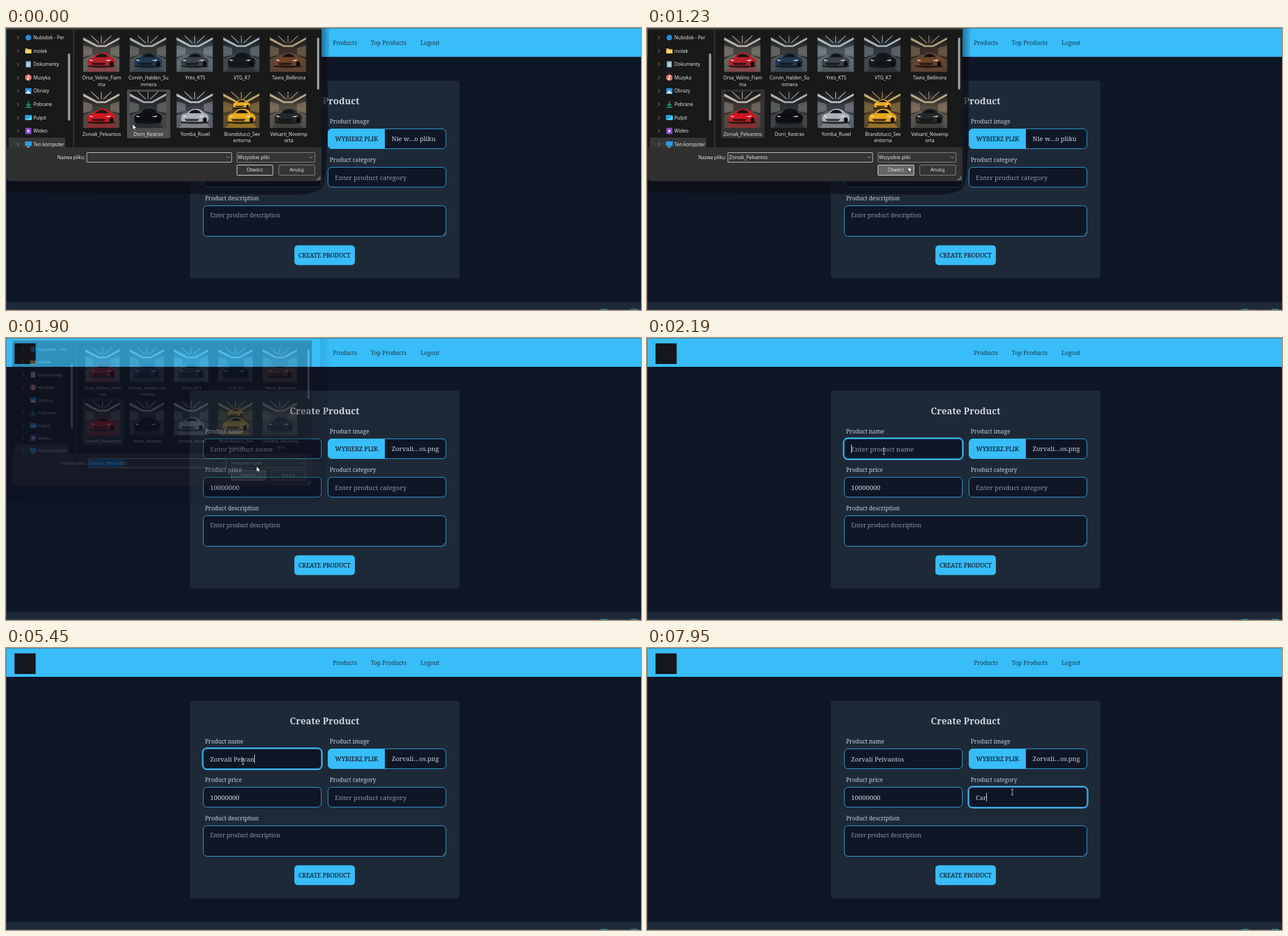
Animation, 1123 px wide and 499 px high, one loop 8 s. Source, as an HTML page:

```html
<!DOCTYPE html>
<html lang="pl">
<head>
<meta charset="utf-8">
<title>Create Product</title>
<style>
  html, body { margin: 0; width: 100%; height: 100%; overflow: hidden; background: #0f172a; }
  svg { display: block; width: 1123px; height: 499px; }
  text { white-space: pre; }
  .slab { font-family: "Noto Serif", serif; }
  .ui { font-family: "Open Sans", "Noto Sans", sans-serif; font-size: 8.4px; fill: #f2f2f2; }
</style>
</head>
<body>
<svg id="stage" viewBox="0 0 1123 499"></svg>
<script>
const NS = 'http://www.w3.org/2000/svg';
const stage = document.getElementById('stage');
const BLUE = '#38bdf8', NAVY = '#0f1626', CARD = '#1e2938', PALE = '#c9d1dc', DIM = '#8d98a8';

function el(parent, tag, attrs, content) {
  const node = document.createElementNS(NS, tag);
  for (const k in attrs) node.setAttribute(k, attrs[k]);
  if (content !== undefined) node.textContent = content;
  return parent.appendChild(node);
}
const set = (node, attrs) => { for (const k in attrs) node.setAttribute(k, attrs[k]); };
const rect = (p, x, y, width, height, fill, more) => el(p, 'rect', { x, y, width, height, fill, ...more });
const path = (p, d, fill, more) => el(p, 'path', { d, fill, ...more });
const slab = (p, x, y, size, fill, str, more) =>
  el(p, 'text', { class: 'slab', x, y, 'font-size': size, fill, ...more }, str);
const ui = (p, x, y, str, more) => el(p, 'text', { class: 'ui', x, y, ...more }, str);

const defs = el(stage, 'defs', {});
function gradient(id, dir, stops) {
  const g = el(defs, 'linearGradient', { id, x2: dir === 'x' ? 1 : 0, y2: dir === 'y' ? 1 : 0 });
  stops.forEach(([offset, color, alpha = 1]) =>
    el(g, 'stop', { offset, 'stop-color': color, 'stop-opacity': alpha }));
  return `url(#${id})`;
}

// ---- Page ----
const page = el(stage, 'g', {});
rect(page, 0, 0, 1123, 499, NAVY);
rect(page, 0, 0, 1123, 51, BLUE);
rect(page, 15, 9.5, 37.5, 36.5, '#14171d');
[[578, 'Products'], [645, 'Top Products'], [733, 'Logout']]
  .forEach(([x, s]) => slab(page, x, 30.4, 10.2, '#17374d', s));
rect(page, 0, 485, 1123, 14, CARD);
rect(page, 1052, 497, 12, 2, '#2b86b0');
rect(page, 1105, 497, 12, 2, '#2b86b0');
rect(page, 325, 93, 477, 350, CARD, { rx: 5 });
slab(page, 563.5, 134.5, 16.2, PALE, 'Create Product', { 'font-weight': 700, 'text-anchor': 'middle' });

[[352, 169, 'Product name'], [572.5, 169, 'Product image'], [352, 237, 'Product price'],
 [572.5, 237, 'Product category'], [352, 304.7, 'Product description']]
  .forEach(([x, y, s]) => slab(page, x, y, 10.15, PALE, s));

function field(x, y, w, h) {
  return rect(page, x, y, w, h, NAVY, { rx: 6.5, stroke: BLUE, 'stroke-width': 0.9 });
}
field(349, 178.5, 208.5, 35);
field(569.5, 178.5, 208.5, 35);
field(349, 246.5, 208.5, 35);
field(569.5, 246.5, 208.5, 35);
field(349, 314.5, 429, 54);
path(page, 'M772 367l5 -5M775 367l2 -2', 'none', { stroke: '#aab', 'stroke-width': 0.8 });
path(page, 'M670 178.5H576a6.5 6.5 0 0 0 -6.5 6.5V207a6.5 6.5 0 0 0 6.5 6.5H670Z', BLUE);
const strong = { 'text-anchor': 'middle', stroke: '#132536', 'stroke-width': 0.25 };
slab(page, 620, 199.8, 10.7, '#132536', 'WYBIERZ PLIK', strong);
rect(page, 510, 384.5, 107, 35, BLUE, { rx: 6 });
slab(page, 563.3, 405.8, 10.6, '#132536', 'CREATE PRODUCT', strong);
slab(page, 361, 269, 11.6, PALE, '10000000');
slab(page, 361, 334.7, 10.08, DIM, 'Enter product description');
const fileText = slab(page, 682, 200, 11.4, PALE, '');

function liveField(x, y, hint) {
  const ring = rect(page, x - 1.6, y - 1.6, 211.7, 38.2, 'none',
    { rx: 8, stroke: '#45bff4', 'stroke-width': 1.7 });
  const holder = slab(page, x + 12, y + 22.3, 11.55, DIM, hint);
  const value = slab(page, x + 12, y + 22.3, 11.3, PALE, '');
  const caret = rect(page, 0, y + 10, 1, 15, '#e5e9ef');
  return (str, focused, caretOn) => {
    value.textContent = str;
    set(holder, { visibility: str ? 'hidden' : 'visible' });
    set(ring, { visibility: focused ? 'visible' : 'hidden' });
    const end = str ? value.getComputedTextLength() : 0;
    set(caret, { x: Math.round(x + 12 + end), visibility: focused && caretOn ? 'visible' : 'hidden' });
  };
}
const nameField = liveField(349, 178.5, 'Enter product name');
const kindField = liveField(569.5, 246.5, 'Enter product category');

// ---- File dialog ----
const shade = el(stage, 'g', {});
path(shade, 'M0 51H568C570 150 569 250 562 276C554 297 525 296 440 294.5L120 292C60 292 30 291 0 288Z', '#0a0e17', { opacity: 0.7 });
rect(shade, 556, 0, 16, 51, gradient('edge', 'x', [[0, '#0d3a55', 0.65], [1, '#0d3a55', 0.1]]));

const dialog = el(stage, 'g', {});
path(dialog, 'M1 0H558V265a6 6 0 0 1 -6 6H7a6 6 0 0 1 -6 -6Z', '#303030');
rect(dialog, 1, 3.5, 557, 207.5, '#191919');
rect(dialog, 118, 3.5, 3, 207.5, '#2c2c2c');
path(dialog, 'M5 211V196a2 2 0 0 1 2 -2H103a2 2 0 0 1 2 2V211Z', '#373737');
rect(dialog, 109.5, 45, 4, 119, '#9b9b9b', { rx: 2 });
rect(dialog, 550, 17, 4, 92, '#9b9b9b', { rx: 2 });

const icons = [
  p => el(p, 'circle', { cx: 0, cy: 0, r: 5, fill: '#1e8fe0' }),
  p => { path(p, 'M-5.5 -4.5h4l1.5 1.5h5.5v7.5h-11Z', '#e0a82e'); rect(p, -5.5, -2, 11, 6.5, '#ffd667', { rx: 0.8 }); },
  p => { rect(p, -4.5, -5.5, 9, 11, '#8fa9bd', { rx: 1 }); path(p, 'M-2.5 -2h5M-2.5 0.3h5M-2.5 2.6h5', 'none', { stroke: '#fff' }); },
  p => { el(p, 'circle', { r: 5.7, fill: '#e0716b' }); path(p, 'M0 2.5V-3l2.5 1', 'none', { stroke: '#fff', 'stroke-width': 1.2 }); el(p, 'circle', { cx: -1, cy: 2.5, r: 1.4, fill: '#fff' }); },
  p => { rect(p, -5.5, -5, 11, 10, '#2a8de0', { rx: 1 }); path(p, 'M-5 4.5L0 -1.5L5 4.5Z', '#e9f5ff'); },
  p => path(p, 'M0 -5.5V3M-3.5 -0.5L0 3L3.5 -0.5M-5 5.2H5', 'none', { stroke: '#19b98c', 'stroke-width': 1.4 }),
  p => { rect(p, -6, -4.5, 12, 9, '#1fa2e0', { rx: 1 }); path(p, 'M-6 4.5L6 -3V4.5Z', '#53cdf2'); },
  p => { rect(p, -5.2, -5.5, 10.4, 11, '#8b4bd0', { rx: 1 }); path(p, 'M-1.5 -2.7L2.8 0L-1.5 2.7Z', '#fff'); },
  p => { rect(p, -6, -5, 12, 8, '#2aa0e6', { rx: 0.8 }); path(p, 'M-3 5H3M0 3V5', 'none', { stroke: '#c7d3dc' }); }
];
['Nubidisk - Per', 'molek', 'Dokumenty', 'Muzyka', 'Obrazy', 'Pobrane', 'Pulpit', 'Wideo', 'Ten komputer']
  .forEach((label, i) => {
    const y = 17 + i * 23.6;
    path(dialog, `M19.8 ${y - 2.8}l2.8 2.8l-2.8 2.8`, 'none', { stroke: '#a8a8a8', 'stroke-width': 0.9 });
    icons[i](el(dialog, 'g', { transform: `translate(39.5 ${y})` }));
    ui(dialog, 48.5, y + 3, label);
  });

const tileBox = [0, 1].map(i => rect(dialog, 131.5 + i * 82.5, 109, 76.5, 86, '#333', { rx: 1 }));

// name lines, body, wall, glow, floor
const cars = [
  ['Orsa_Velino_Fiam|ma', '#b3202a', '#4a4743', '#e8e2d6', '#77736d'],
  ['Corvin_Halden_Su|mmera', '#20384f', '#3d3a36', '#cfe0ea', '#56606a'],
  ['Ynto_KT5', '#3a4148', '#4c5860', '#dbe7ec', '#6e7b82'],
  ['VTG_K7', '#15191e', '#323a40', '#d5e4ec', '#4a545b'],
  ['Tavra_Bellinora', '#6f4228', '#3b3029', '#e2c79c', '#66503e'],
  ['Zorvali_Pelvantos', '#d0161f', '#403a35', '#f3ead8', '#6a4f4a'],
  ['Dorn_Kestrav', '#0c0e11', '#2f3133', '#d8dde0', '#4b5054'],
  ['Yomba_Ruvel', '#aab1b8', '#3a4148', '#eef3f6', '#6c747b'],
  ['Brandolucci_Sev|entorna', '#e8a91c', '#4f3c1c', '#f3d790', '#6d5a34'],
  ['Velsarti_Novemp|orta', '#23282b', '#5a4e42', '#e3d0b0', '#676058']
];
function photo(p, x, y, i, [, body, wall, glow, floor]) {
  const g = el(p, 'g', { transform: `translate(${x} ${y})` });
  rect(g, 0, 0, 64, 64, gradient('w' + i, 'y', [[0, '#17181a'], [0.45, wall], [1, '#1b1b1c']]));
  path(g, 'M0 3L25 17H39L64 3V7L40 20H24L0 8Z', glow, { opacity: 0.75 });
  path(g, 'M14 0L28 13M32 0V13M50 0L36 13', 'none', { stroke: glow, 'stroke-width': 1.2, opacity: 0.7 });
  path(g, 'M0 17L16 22V34L0 38ZM64 17L48 22V34L64 38Z', glow, { opacity: 0.25 });
  path(g, 'M0 42L18 34H46L64 42V64H0Z', floor, { opacity: 0.75 });
  path(g, 'M4 64L14 52H50L60 64Z', body, { opacity: 0.4 });
  const drawCar = (dy, scale) => {
    const c = el(g, 'g', { transform: `translate(32 ${dy}) scale(${scale})` });
    el(c, 'ellipse', { cx: 0, cy: 12, rx: 25, ry: 3, fill: '#0a0a0a', opacity: 0.7 });
    path(c, 'M-24 4Q-23 -3 -13 -4Q-8 -12 2 -12Q12 -12 17 -4Q25 -2 25 5L23 11H-21Q-25 10 -24 4Z', body);
    path(c, 'M-10 -4Q-6 -10 1 -10Q8 -10 12 -4Z', '#101417');
    path(c, 'M-21 0l8 2l-6 1ZM6 2l11 -2l-3 3Z', '#f4f6f6', { opacity: 0.85 });
    path(c, 'M-18 6H8L5 10H-15Z', '#101010', { opacity: 0.75 });
    el(c, 'ellipse', { cx: 18, cy: 8, rx: 3.6, ry: 4.6, fill: '#0b0b0b' });
  };
  if (i === 8) drawCar(21, 0.62);
  drawCar(42, 1);
}
cars.forEach((car, i) => {
  const col = i % 5, row = Math.floor(i / 5);
  photo(dialog, 136.5 + col * 82.55, 13.5 + row * 99.3, i, car);
  car[0].split('|').forEach((line, n) =>
    ui(dialog, 169.3 + col * 82.7, 91.2 + row * 99.3 + n * 11.8, line, { 'text-anchor': 'middle' }));
});
rect(dialog, 121, 211, 430, 8, '#303030');

function box(x, y, w, h, stroke) {
  return rect(dialog, x + 0.5, y + 0.5, w, h, '#343434', { rx: 1, stroke, 'stroke-width': 1 });
}
ui(dialog, 140, 232, 'Nazwa pliku:', { 'text-anchor': 'end' });
box(142.5, 220, 256, 17, '#d0d0d0');
const mark = rect(dialog, 145, 222.5, 64, 12.5, '#0078d7');
const chosen = ui(dialog, 145.3, 232, 'Zorvali_Pelvantos', { 'font-size': 8.4 });
box(408, 220, 138, 17, '#8c8c8c');
ui(dialog, 410, 232, 'Wszystkie pliki');
[392.5, 540].forEach(x =>
  path(dialog, `M${x - 2.5} 227.5l2.5 2.5l2.5 -2.5`, 'none', { stroke: '#bbb', 'stroke-width': 0.9 }));
const openBtn = box(408, 242, 63.5, 18, '#e6e6e6');
box(482, 242, 63.5, 18, '#8c8c8c');
ui(dialog, 440, 254.2, 'Otwórz', { 'text-anchor': 'middle' });
ui(dialog, 514, 254.2, 'Anuluj', { 'text-anchor': 'middle' });
path(dialog, 'M555 263v6M552.5 265.5v3.5M550 267.5v1.5', 'none', { stroke: '#c8c8c8', 'stroke-width': 1.3, 'stroke-dasharray': '1.5 1' });

// ---- Screen edge and pointer ----
path(stage, 'M0 0.5H1123M0.5 0V499M0 498.5H1123', 'none', { stroke: '#56616c', 'stroke-width': 1, opacity: 0.75 });
const arrow = path(stage, 'M0 0V9.8L2.2 7.7L3.9 11.4L5.4 10.7L3.8 7.1H6.9Z', '#fff', { stroke: '#000', 'stroke-width': 0.6 });
const beam = path(stage, 'M-2 -5H2M0 -5V5M-2 5H2', 'none', { stroke: '#d4d8de', 'stroke-width': 0.9 });

// ---- Timeline ----
const NAME = 'Zorvali Pelvantos', KIND = 'Car';
const pointer = [ // time, x, y, I-beam
  [0, 224, 170, 0], [120, 211, 166, 0], [270, 200, 161, 0], [400, 197, 160, 0],
  [810, 218, 166, 0], [940, 345, 197, 0], [1080, 458, 228, 0], [1230, 462, 245, 0], [1370, 463, 248, 0],
  [1900, 443, 227, 0], [2050, 425, 207, 1], [2190, 419, 201, 1],
  [6460, 436, 206, 1], [6590, 520, 227, 0], [6720, 616, 249, 1], [6860, 646, 255, 1]
];
const nameKeys = [3030, 3150, 3610, 3730, 3850, 3980, 4100, 4380, 4520, 4650,
  4930, 5070, 5200, 5450, 5570, 5720, 5870];
const kindKeys = [7430, 7690, 7950];
const typed = (keys, t) => keys.filter(k => k <= t).length;
const between = (t, a, b) => t >= a && t < b;

function draw(t) {
  const [, x, y, isBeam] = pointer.filter(p => p[0] <= t).pop();
  set(arrow, { transform: `translate(${x} ${y})`, visibility: isBeam ? 'hidden' : 'visible' });
  set(beam, { transform: `translate(${x} ${y})`, visibility: isBeam ? 'visible' : 'hidden' });

  const open = t < 1900, fading = between(t, 1900, 2050);
  set(dialog, {
    opacity: open ? 1 : fading ? 0.27 : 0,
    transform: open ? '' : 'translate(10.5 4) scale(.95)'
  });
  set(shade, { opacity: open ? 1 : fading ? 0.2 : 0 });

  set(tileBox[1], { fill: '#4d4d4d', opacity: t < 120 ? 1 : 0 });
  set(tileBox[0], { fill: t < 530 ? '#4d4d4d' : t < 940 ? '#757575' : '#333', opacity: t < 270 ? 0 : 1 });
  set(chosen, { opacity: t < 530 ? 0 : 1 });
  set(mark, { opacity: t < 1500 ? 0 : 1 });
  set(openBtn, { fill: t >= 1230 ? '#656565' : '#343434' });

  fileText.textContent = open ? 'Nie w…o pliku' : 'Zorvali…os.png';
  const nameOn = between(t, 2190, 2750) || between(t, 3030, 6460);
  nameField(NAME.slice(0, typed(nameKeys, t)), between(t, 2190, 7000), nameOn);
  kindField(KIND.slice(0, typed(kindKeys, t)), t >= 7000, true);
}

const start = performance.now();
function tick() {
  draw((performance.now() - start) % 8000);
  requestAnimationFrame(tick);
}
tick();
</script>
</body>
</html>
```
